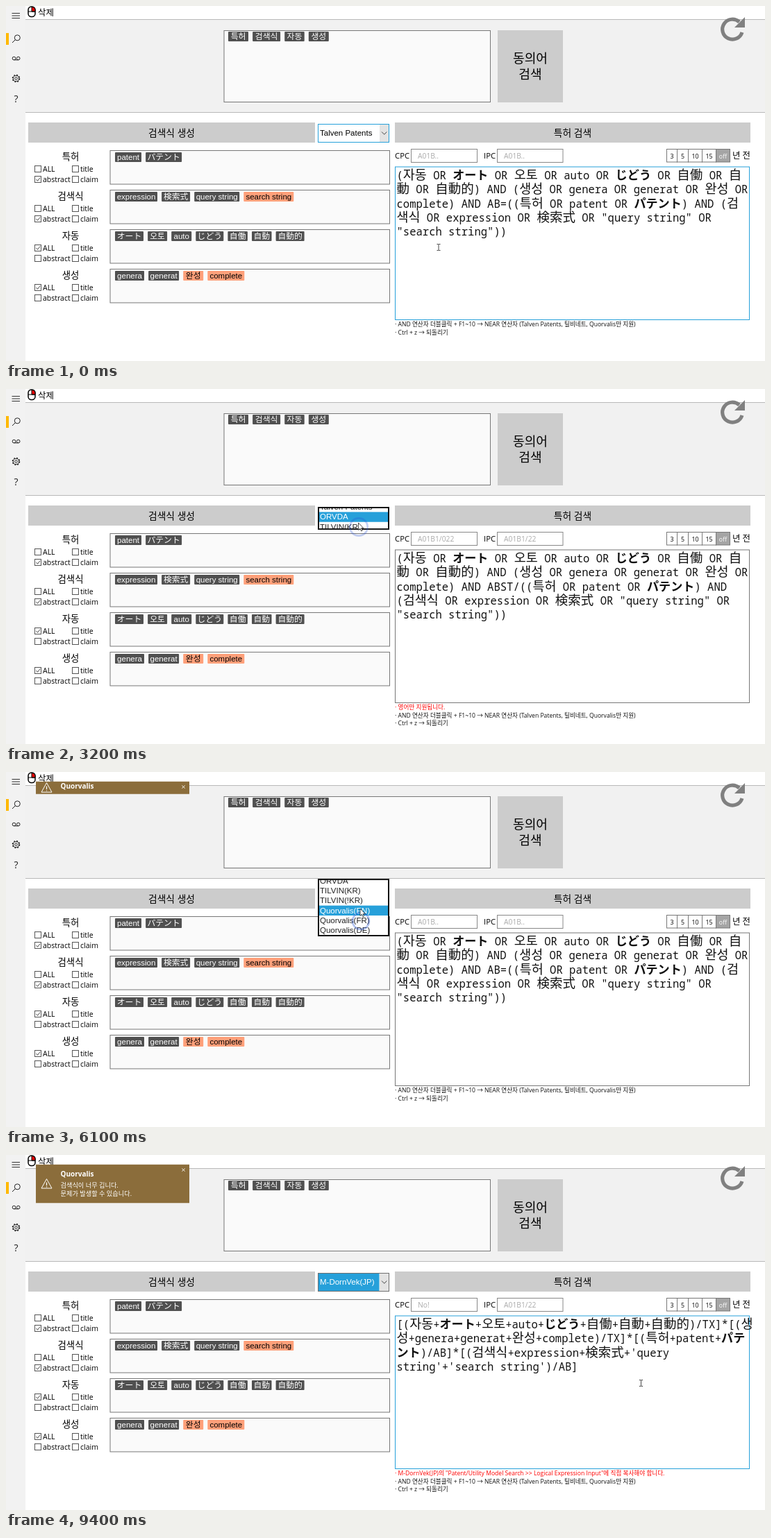
These frames come from a looping animation (1093x512 px, 9500 ms). An HTML page:

```html
<!DOCTYPE html>
<html lang="ko">
<head>
<meta charset="utf-8">
<style>
html, body { margin: 0; width: 100%; height: 100%; overflow: hidden; background: #fff; }
svg { display: block; }
text { font-family: 'Open Sans', 'Noto Sans CJK KR', 'Noto Sans CJK JP', 'Noto Sans CJK', sans-serif; white-space: pre; }
.arial { font-family: 'Liberation Sans', 'Noto Sans CJK KR', 'Noto Sans CJK JP', sans-serif; }
.mono { font-family: 'Noto Sans Mono', monospace; }
.mono tspan { font-family: 'Noto Sans CJK KR', 'Noto Sans CJK JP', 'Noto Sans CJK', sans-serif; font-size: 18.5px; }
.mono .kana { font-size: 17.1px; font-weight: bold; }
.mid { text-anchor: middle; }
.medium { font-weight: 500; }
</style>
</head>
<body>
<svg width="1093" height="512" viewBox="0 0 1093 512"><g id="page"></g><g id="live"></g></svg>
<script>
const LOOP = 9500, STEP = 14.35, BLUE = '#26a0da';
const clamp = v => Math.max(0, Math.min(1, v));

const rect = (x, y, w, h, fill, stroke = 'none', sw = 1) =>
  `<rect x="${x}" y="${y}" width="${w}" height="${h}" fill="${fill}" stroke="${stroke}" stroke-width="${sw}"/>`;
const text = (x, y, size, str, cls = '', fill = '#000') =>
  `<text x="${x}" y="${y}" font-size="${size}" class="${cls}" fill="${fill}">${str}</text>`;
const line = (d, color = '#222', sw = 1, fill = 'none') =>
  `<path d="${d}" stroke="${color}" stroke-width="${sw}" fill="${fill}"/>`;
const circle = (x, y, r, color = '#222', sw = 1, more = '') =>
  `<circle cx="${x}" cy="${y}" r="${r}" fill="none" stroke="${color}" stroke-width="${sw}" ${more}/>`;

// ---- fixed page ----
function tags(x, y, list) {
  return list.map(([word, w, warm]) => {
    const out = `<rect x="${x}" y="${y}" width="${w}" height="14" rx="1" fill="${warm ? '#ffa07a' : '#505050'}"/>` +
      text(x + w / 2, y + 11, /[a-z]/.test(word) ? 11.5 : 11.8, word, 'arial mid', warm ? '#000' : '#fff');
    x += w + 6.1;
    return out;
  }).join('');
}

function check(x, y, label, on) {
  return rect(x + .5, y + .5, 9, 9, '#fff', '#555') +
    (on ? line(`M${x + 2.5} ${y + 5}l2 2.3 3.5-4.6`, '#444') : '') + text(x + 12, y + 9, 10.5, label);
}

const rows = [
  ['특허', 0, [['patent', 38], ['パテント', 52]]],
  ['검색식', 0, [['expression', 61], ['検索式', 41], ['query string', 65], ['search string', 72, 1]]],
  ['자동', 1, [['オート', 41], ['오토', 28], ['auto', 29], ['じどう', 40], ['自働', 28.5], ['自動', 28.5], ['自動的', 41]]],
  ['생성', 1, [['genera', 42], ['generat', 44], ['완성', 29, 1], ['complete', 53, 1]]]
];

function drawRow([name, all, words], i) {
  const y = 208 + 57 * i;
  return text(93, y + 14, 13.4, name, 'mid medium') +
    check(41, y + 22, 'ALL', all) + check(95, y + 22, 'title') +
    check(41, y + 37, 'abstract', !all) + check(95, y + 37, 'claim') +
    rect(150, y + .5, 402.5, 48.5, '#fafafa', '#777') + tags(157, y + 3, words);
}

const years = [[951, 15, '3'], [966, 16, '5'], [982, 20, '10'], [1002, 20, '15'], [1022, 20, 'off']];

document.getElementById('page').innerHTML =
  rect(28, 20, 1065, 133, '#f1f1f1') + line('M28 19.5H1093M28 153.5H1093', '#b8b8b8') +
  rect(0, 0, 28, 512, '#f2f2f2') + rect(0, 39, 4, 17, '#ffb900') +
  line('M8.5 10.5h11.5M8.5 14h11.5M8.5 17.5h11.5', '#333') +
  circle(16.3, 45.8, 4) + line('M13.4 48.6L9 53') +
  circle(11.5, 75.5, 2.3) + circle(17.7, 75.5, 2.3) + line('M11.5 77.8h6.2') +
  circle(14.5, 104.5, 5.1, '#222', 1.4, 'stroke-dasharray="2 2"') + circle(14.5, 104.5, 4.1) + circle(14.5, 104.5, 1.8) +
  text(14.5, 138.5, 14, '?', 'mid', '#222') +
  `<rect x="32" y="1" width="10" height="14.5" rx="4.5" fill="#fff" stroke="#000" stroke-width="1.5"/>` +
  line('M37 1.5V8H42V6Q42 1.5 37 1.5Z', '#000', 1, '#e00') + line('M32 8h10', '#000') +
  text(46, 14, 12.5, '삭제') +
  line('M1060 38A14.5 14.5 0 1 1 1056 23', '#808080', 5.2) + line('M1064 16V31H1049Z', 'none', 0, '#808080') +
  rect(314, 35.5, 383.5, 103, '#fafafa', '#777') +
  tags(320, 37, [['특허', 29], ['검색식', 40], ['자동', 28.5], ['생성', 29]]) +
  rect(708, 35, 94, 104, '#ccc') + text(755, 82, 18.1, '동의어', 'mid') + text(755, 105, 18.1, '검색', 'mid') +
  rect(32, 168, 413, 29, '#ccc') + text(238.5, 187.5, 13.8, '검색식 생성', 'mid') +
  rect(560, 168, 512, 29, '#ccc') + text(816, 187.5, 13.8, '특허 검색', 'mid') +
  rows.map(drawRow).join('') +
  text(560, 220, 11.3, 'CPC') + text(688, 220, 11.3, 'IPC') +
  years.map(([x, w, s]) => rect(x + .5, 206.5, w, 18.5, s == 'off' ? '#a5a5a5' : '#fff', '#777') +
    text(x + w / 2 + .5, 219.5, 8.8, s, 'mid', s == 'off' ? '#fff' : '#000')).join('') +
  text(1046, 219.5, 12.4, '년 전', 'medium');

// ---- search services and their queries ----
const names = ['Talven Patents', 'ORVDA', 'TILVIN(KR)', 'TILVIN(!KR)', 'Quorvalis(EN)', 'Quorvalis(FR)', 'Quorvalis(DE)', 'M-DornVek(JP)'];
const head = ['(자동 OR オート OR 오토 OR auto OR じどう OR 自働 OR 自', '動 OR 自動的) AND (생성 OR genera OR generat OR 완성 OR'];
const plain = {
  query: [...head, 'complete) AND AB=((특허 OR patent OR パテント) AND (검', '색식 OR expression OR 検索式 OR "query string" OR', '"search string"))'],
  cpc: 'A01B..', ipc: 'A01B..'
};
const services = {
  0: plain, 4: plain,
  1: {
    query: [...head, 'complete) AND ABST/((특허 OR patent OR パテント) AND', '(검색식 OR expression OR 検索式 OR "query string" OR', '"search string"))'],
    cpc: 'A01B1/022', ipc: 'A01B1/22', warn: '영어만 지원됩니다.'
  },
  2: {
    query: ['(자동+オート+오토+auto+じどう+自働+自動+自動的)*(생성', '+genera+generat+완성+complete)*AB=[(특허+patent+パテン', 'ト)*(검색식+expression+検索式+"query string"+"search', 'string")]'],
    cpc: 'A01B..', ipc: 'A01B..',
    warn: "처음 '특허 검색' 버튼을 클릭하면, TILVIN 사이트로 이동합니다. 이후 몇 번은 검색 결과가 뜨지 않을 수 있습니다."
  },
  7: {
    query: ['[(자동+オート+오토+auto+じどう+自働+自動+自動的)/TX]*[(생', '성+genera+generat+완성+complete)/TX]*[(특허+patent+パテ', "ント)/AB]*[(검색식+expression+検索式+'query", "string'+'search string')/AB]"],
    cpc: 'No!', ipc: 'A01B1/22',
    warn: 'M-DornVek(JP)의 "Patent/Utility Model Search &gt;&gt; Logical Expression Input"에 직접 복사해야 합니다.'
  }
};
const notes = ['AND 연산자 더블클릭 + F1~10 → NEAR 연산자 (Talven Patents, 틸비네트, Quorvalis만 지원)', 'Ctrl + z → 되돌리기'];
const cjk = s => s.replace(/[가-힣一-龥]+|[ぁ-ヿ]+/g, m => `<tspan${/[ぁ-ヿ]/.test(m) ? ' class="kana"' : ''}>${m}</tspan>`);

// ---- timeline ----
// opening click, choosing click, old item, new item
const picks = [[1500, 2915, 0, 1], [3590, 4300, 1, 2], [4950, 5930, 2, 4], [6690, 7750, 4, 7]];
const path = [
  [450, 623, 348], [1200, 508, 189], [1650, 508, 189], [2000, 508, 199], [3050, 508, 199], [3200, 507.5, 193],
  [3450, 509, 184], [3750, 509, 184], [4000, 510, 197], [4330, 510, 197], [4400, 509, 192], [4650, 509, 183],
  [5150, 509, 183], [5500, 509, 198], [5680, 509, 198], [5850, 511, 215], [6000, 511, 215], [6100, 510, 197],
  [6350, 509, 181.5], [6950, 509, 181.5], [7400, 512, 231], [7650, 511, 226], [7870, 511, 226],
  [8700, 907, 300], [9050, 907, 300], [9400, 914.5, 329]
];

function pointer(t) {
  const i = path.findIndex(k => k[0] > t);
  if (i == 0) return path[0].slice(1);
  if (i < 0) return path[path.length - 1].slice(1);
  const [a, b] = [path[i - 1], path[i]], u = (t - a[0]) / (b[0] - a[0]), e = u * u * (3 - 2 * u);
  return [1, 2].map(j => a[j] + (b[j] - a[j]) * e);
}

function combo(sel, used) {
  return rect(449.5, 170.5, 102, 26, '#fff', used ? '#707070' : BLUE) +
    (used ? rect(450, 171, 87.5, 25, BLUE) : '') + rect(538, 171, 13, 25, '#e3e3e3') +
    line('M541 181.5l3.7 3.7 3.7-3.7', '#444') +
    text(452, 187.3, 11.5, names[sel], 'arial', used ? '#fff' : '#000');
}

function popup(t, [open, pick, from, to], y) {
  const close = clamp((t - pick - 70) / 230);
  const size = t < pick ? 1 - (1 - clamp((t - open - 70) / 250)) ** 3 : 1 - close;
  if (size <= 0) return '';
  const top = 170 - STEP * from * size, h = 27 + 100 * size;
  const sel = t < pick ? from : to;
  const items = names.map((name, i) => {
    const mid = 183.7 + STEP * (i - from - (to - from) * close) - top;
    const hover = t < pick && Math.abs(y - top - mid) < STEP / 2;
    const bg = i == sel ? BLUE : hover ? '#ddd' : 'none';
    return rect(1, mid - STEP / 2, 101, STEP, bg) + text(3, mid + 3.8, 11.5, name, 'arial', i == sel ? '#fff' : '#222');
  }).join('');
  return `<svg x="449" y="${top}" width="103" height="${h}">` + rect(0, 0, 103, h, '#fff') + items +
    rect(1, 1, 101, h - 2, 'none', '#111', 2) + '</svg>';
}

function toast(t) {
  const p = clamp((t - 6010) / 280), h = 56 * p;
  if (!p) return '';
  const y = 8 + 9 * p;
  return `<svg x="43" y="13.5" width="221" height="${h}">` + rect(0, 0, 221, 56, '#8b6d3b') +
    line(`M15.5 ${h / 2 - 7}l7.5 13.5h-15z`, '#fff') +
    line(`M15.5 ${h / 2 - 2}v4.5m0 1.3v1.2`, '#fff', 1.2) +
    text(35.5, y, 10, 'Quorvalis', '" font-weight="bold', '#fff') +
    text(35.5, y + 16, 9.2, '검색식이 너무 깁니다.', '', '#fff') +
    text(35.5, y + 28.5, 9.2, '문제가 발생할 수 있습니다.', '', '#fff') +
    line('M210.5 6l4 4m0-4l-4 4', '#fff') + '</svg>';
}

function ring(t, click) {
  const d = t - click;
  if (d < -105 || d > 400) return '';
  const [x, y] = pointer(click), r = Math.min(14, 3 + Math.max(0, d) * .06);
  if (d < 20) return `<circle cx="${x}" cy="${y}" r="3" fill="#2452d6"/>`;
  return circle(x, y, r - 1.3, '#2452d6', 2.8, `opacity="${d <= 105 ? .95 : .45 - d / 1600}"`);
}

function draw(t) {
  const [x, y] = pointer(t);
  const inBox = x > 560 && x < 1071 && y > 232 && y < 453;
  const chosen = delay => picks.reduce((s, p) => t >= p[1] + delay ? p[3] : s, 0);
  const sel = chosen(0), info = services[chosen(60)];
  const all = info.warn ? [info.warn, ...notes] : notes;
  return rect(583.5, 206.5, 95, 19, '#fff', '#888') + text(593, 219.5, 10.3, info.cpc, '', '#aaa') +
    rect(707.5, 206.5, 94.5, 19, '#fff', '#888') + text(717, 219.5, 10.3, info.ipc, '', '#aaa') +
    rect(560.5, 232, 510, 220.5, '#fff', inBox ? BLUE : '#777') +
    info.query.map((s, i) => text(562.5, 250 + 20.25 * i, 15.55, cjk(s), 'mono', '#111')).join('') +
    all.map((s, i) => text(560, 462 + 11.5 * i, 8.6, '· ' + s, '', info.warn && !i ? '#f00' : '#111')).join('') +
    combo(sel, t >= picks[0][1]) +
    picks.map(p => t > p[0] && t < p[1] + 310 ? popup(t, p, y) : '').join('') +
    toast(t) +
    picks.map(p => ring(t, p[0]) + ring(t, p[1])).join('') +
    (inBox
      ? line(`M${x - 2.5} ${y - 4.5}h2l.5.5.5-.5h2M${x} ${y - 4}v8M${x - 2.5} ${y + 4.5}h2l.5-.5.5.5h2`, '#333', .9)
      : line(`M${x} ${y}v10.5l2.4-2.2 1.7 3.6 1.6-.8-1.6-3.4h3.3z`, '#222', .8, '#fff'));
}

const live = document.getElementById('live');
const start = performance.now();
function tick(now) {
  live.innerHTML = draw(Math.max(0, now - start) % LOOP);
  requestAnimationFrame(tick);
}
tick(start);
</script>
</body>
</html>
```
